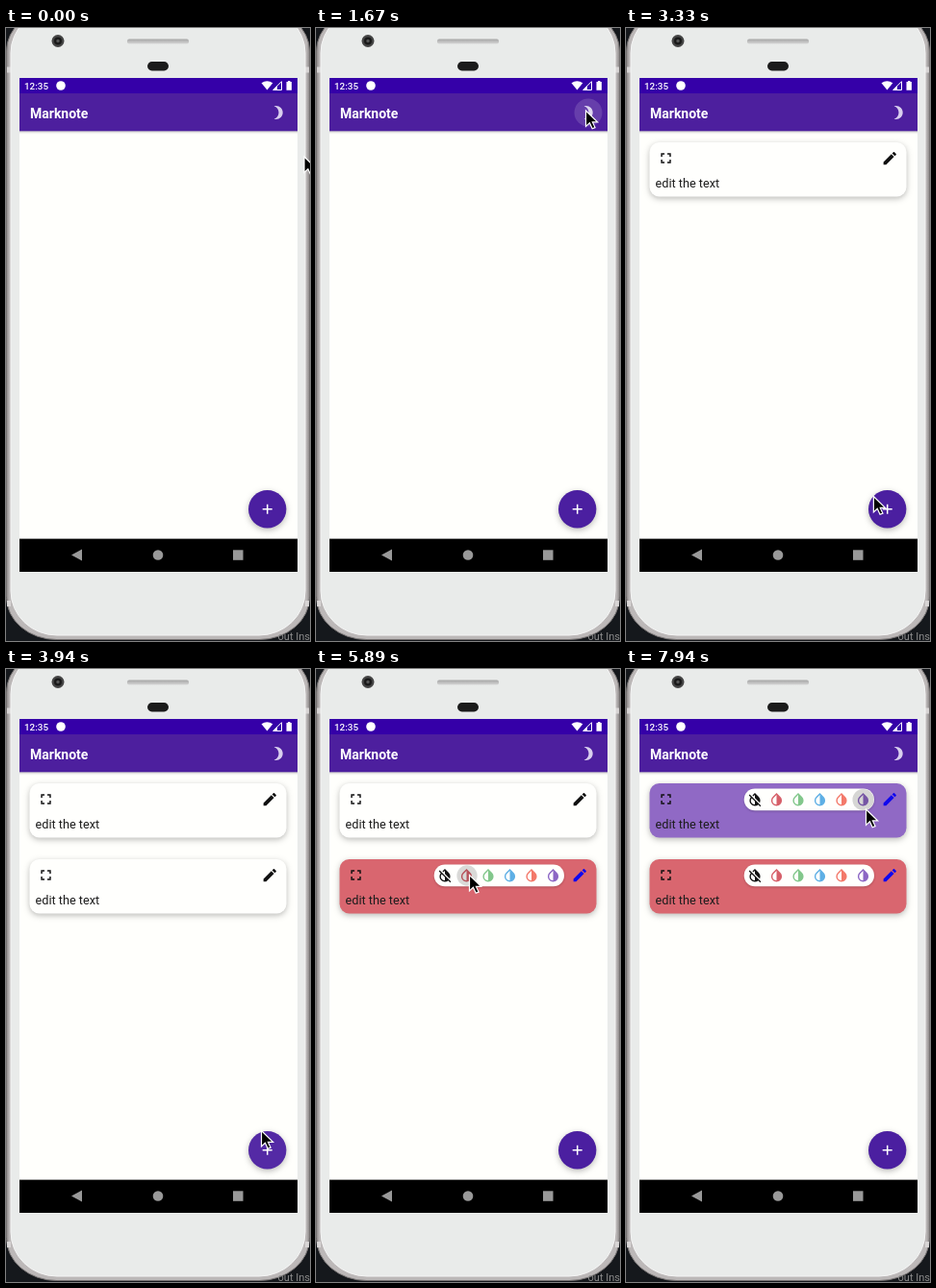
An HTML page that plays this animation: 316x638 px, repeating every 8 s.

```html
<!DOCTYPE html>
<html lang="en">
<head>
<meta charset="utf-8">
<title>Notes app demo</title>
<style>
  html, body { margin: 0; width: 100%; height: 100%; overflow: hidden; background: #15181c; }
  svg { display: block; width: 100vw; height: 100vh; }
  text { font-family: Roboto, sans-serif; }
  .bar { filter: drop-shadow(0 1px 1px rgba(0, 0, 0, .25)); }
  .raised { filter: drop-shadow(0 2px 3px rgba(0, 0, 0, .27)); }
  .pill { filter: drop-shadow(0 1px 1px rgba(0, 0, 0, .2)); }
</style>
</head>
<body>
<svg viewBox="0 0 316 638">
  <defs>
    <linearGradient id="speaker" x2="0" y2="1">
      <stop stop-color="#a5a5a5"/><stop offset="1" stop-color="#d6d6d6"/>
    </linearGradient>
    <linearGradient id="metal">
      <stop stop-color="#8b8787"/><stop offset=".01" stop-color="#bcb8b8"/>
      <stop offset=".99" stop-color="#bcb8b8"/><stop offset="1" stop-color="#8b8787"/>
    </linearGradient>
    <clipPath id="screenClip"><rect x="14" y="52" width="289" height="514"/></clipPath>
    <clipPath id="fabClip"><circle cx="271.7" cy="500.7" r="19.7"/></clipPath>
    <path id="moon" d="M9 2c-1.05 0-2.05.16-3 .46 4.06 1.27 7 5.06 7 9.54 0 4.48-2.94 8.27-7 9.54.95.3 1.95.46 3 .46 5.52 0 10-4.48 10-10S14.52 2 9 2z"/>
    <path id="sun" d="M20 8.69V4h-4.69L12 .69 8.69 4H4v4.69L.69 12 4 15.31V20h4.69L12 23.31 15.31 20H20v-4.69L23.31 12zM12 18a6 6 0 1 1 0-12 6 6 0 0 1 0 12z" fill-rule="evenodd"/>
    <path id="expand" d="M7 14H5v5h5v-2H7zM5 10h2V7h3V5H5zM17 17h-3v2h5v-5h-2zM14 5v2h3v3h2V5z"/>
    <path id="pencil" d="M3 17.25V21h3.75L17.81 9.94l-3.75-3.75zM20.71 7.04c.39-.39.39-1.02 0-1.41l-2.34-2.34c-.39-.39-1.02-.39-1.41 0l-1.83 1.83 3.75 3.75z"/>
    <path id="drop" d="M17.66 7.93L12 2.27 6.34 7.93c-3.12 3.12-3.12 8.19 0 11.31 3.12 3.12 8.2 3.12 11.32 0 3.12-3.12 3.12-8.19 0-11.31zM12 19.59c-3.3 0-6-2.7-6-6 0-1.6.62-3.11 1.76-4.24L12 5.1z"/>
    <path id="dropOff" d="M20.65 20.87L4.27 4.5 3 5.77l2.78 2.78c-2.55 3.14-2.36 7.76.56 10.69 2.92 2.92 7.55 3.12 10.69.56l2.7 2.7L21 21.23zM12 19.59c-3.3 0-6-2.7-6-6 0-1.32.43-2.57 1.21-3.6L12 14.77zM12 5.1v4.58l7.25 7.26c1.37-2.96.84-6.57-1.6-9.01L12 2.27l-3.7 3.7 1.41 1.41z"/>
  </defs>

  <!-- phone -->
  <rect width="316" height="638" fill="#15181c"/>
  <rect x=".5" y="-20" width="315" height="656.5" rx="52" ry="44" fill="url(#metal)" stroke="#777373"/>
  <path d="M1 43.5h4M311 43.5h4M1 599h4M311 599h4" stroke="#d8d5d5" stroke-width="6"/>
  <rect x="5" y="-20" width="306" height="652" rx="48" ry="46" fill="#e9ebea" stroke="#f5f5f5"/>
  <text x="316" y="637" font-size="11" text-anchor="end" fill="#8a8a8a">out Ins</text>
  <circle cx="54" cy="13.5" r="6.5" fill="#454545"/>
  <circle cx="54" cy="13.5" r="4" fill="#191919"/>
  <circle cx="54" cy="13.5" r="1.7" fill="#555"/>
  <rect x="126" y="11.5" width="64" height="5" rx="2" fill="url(#speaker)"/>
  <rect x="147" y="35" width="22" height="9.5" rx="4.7" fill="#1b1b1b"/>

  <!-- screen -->
  <g clip-path="url(#screenClip)">
    <rect id="page" x="14" y="52" width="289" height="514"/>
    <rect class="bar" x="10" y="60" width="297" height="47.3" fill="#4d1f9e"/>
    <rect x="14" y="52" width="289" height="16" fill="#3500a8"/>
    <rect x="14" y="531.6" width="289" height="35" fill="#000"/>
  </g>
  <g fill="#fff">
    <text x="19" y="64" font-size="9.9" font-weight="500">12:35</text>
    <circle cx="57" cy="60" r="4.8"/>
    <path d="M265.5 57.3q5.9-4 11.8 0l-5.9 7.2z"/>
    <path d="M286.5 55.7v8.8h-8.8z" fill="none" stroke="#fff"/>
    <path d="M282 60v4.5h-4.3z"/>
    <path d="M291.5 56h1.5v-1h2.4v1h1.5v8.7h-5.4z"/>
    <text x="25" y="94" font-size="14" font-weight="700">Marknote</text>
  </g>
  <use id="themeIcon" fill="#d9cfee" transform="translate(274.4 79.6) scale(.7)"/>
  <g fill="#999">
    <path d="M68 548.5l11-6v12z"/>
    <circle cx="158" cy="548.5" r="5.3"/>
    <rect x="236" y="543.3" width="10.5" height="10.5"/>
  </g>
  <g id="cards"></g>
  <circle class="raised" cx="271.7" cy="500.7" r="19.7" fill="#4b1fa0"/>
  <path d="M266.7 500.7h10M271.7 495.7v10" stroke="#fff" stroke-width="1.5"/>
  <g id="ripples"></g>
  <path id="cursor" d="M0 0V16.4L3.9 12.8 6.7 18.8 9.6 17.6 6.9 11.9H12.1Z" fill="#000" stroke="#fff" stroke-width="1.2"/>
</svg>
<script>
const TICKS_PER_SECOND = 18, LOOP = 8000;
const $ = id => document.getElementById(id);
const clamp = v => Math.max(0, Math.min(1, v));
const swatches = ['#111', '#d65f69', '#82c78b', '#5eafe5', '#f3796a', '#8c66c4'];

// All times below are in ticks.
const darkFrom = 14, darkTo = 30;
const cards = [
  { y: 119, shown: 53, menu: 125, painted: 139, color: '#9069c5' },
  { y: 198, shown: 67, menu: 85, painted: 106, color: '#d9666f' }
];
const ripples = [
  { from: 13, to: 20, x: 283, y: 88, r0: 8, r1: 17, color: '#fff', alpha: .27 },
  { from: 29, to: 36, x: 283, y: 88, r0: 14, r1: 17, color: '#fff', alpha: .14 },
  { from: 51, to: 58, x: 271.7, y: 500.7, r0: 8, r1: 22, color: '#fff', alpha: .15, fab: true },
  { from: 65, to: 74, x: 271.7, y: 500.7, r0: 8, r1: 22, color: '#fff', alpha: .07, fab: true },
  { from: 83, to: 91, x: 274, y: 215, r0: 8, r1: 17, color: '#000', alpha: .14 },
  { from: 105, to: 112, x: 157, y: 215, r0: 10.5, r1: 11.5, color: '#000', alpha: .15 },
  { from: 123, to: 131, x: 274, y: 136, r0: 8, r1: 17, color: '#000', alpha: .14 },
  { from: 138, to: 147, x: 246.5, y: 136, r0: 9, r1: 11.5, color: '#000', alpha: .16 }
];
// [tick, x, y] of the pointer tip
const path = [
  [3, 310, 134], [6, 275, 83], [7, 279.5, 85], [22, 279.5, 85], [23, 280.5, 86],
  [41, 280.5, 86], [47, 254.5, 490], [59, 254.5, 490], [62, 265.5, 480.5],
  [73, 265.5, 480.5], [78, 270, 236], [79, 270, 236], [82, 270, 209], [92, 270, 209],
  [94, 215, 229], [96, 162, 216], [98, 162, 216], [102, 159.5, 214.5], [111, 159.5, 214.5],
  [118, 263, 154.5], [119, 263, 154.5], [120, 263, 146], [131, 263, 146], [136, 249.5, 146]
];

const icon = (name, x, y, scale, fill, extra = '') =>
  `<use href="#${name}" fill="${fill}" transform="translate(${x} ${y}) scale(${scale}) translate(-12 -12)" ${extra}/>`;

$('cards').innerHTML = cards.map(card => `
  <g transform="translate(0 ${card.y})">
    <rect class="raised" x="24.5" width="267" height="56.5" rx="10"/>
    ${icon('expand', 41.5, 16.5, .74, '#111')}
    <text x="30.5" y="47" font-size="12.7" fill="#1c1c1c">edit the text</text>
    ${icon('pencil', 274.3, 16.6, .74, '#111', 'class="edit"')}
    <g class="menu">
      <rect class="pill" x="122.7" y="5.5" width="135.3" height="22.7" rx="11.3" fill="#fffffd"/>
      ${swatches.map((c, i) => icon(i ? 'drop' : 'dropOff', 134 + 22.5 * i, 16.8, .7, c)).join('')}
    </g>
  </g>`).join('');
cards.forEach((card, i) => {
  const g = card.group = $('cards').children[i];
  card.body = g.querySelector('.raised');
  card.edit = g.querySelector('.edit');
  card.popup = g.querySelector('.menu');
});

$('ripples').innerHTML = ripples.map(r =>
  `<g ${r.fab ? 'clip-path="url(#fabClip)"' : ''}><circle cx="${r.x}" cy="${r.y}" fill="${r.color}"/></g>`).join('');
ripples.forEach((r, i) => r.circle = $('ripples').children[i].firstChild);

function pointerAt(tick) {
  const next = path.findIndex(k => k[0] > tick);
  if (next === 0) return path[0].slice(1);
  if (next < 0) return path[path.length - 1].slice(1);
  const [t0, x0, y0] = path[next - 1], [t1, x1, y1] = path[next];
  const p = (tick - t0) / (t1 - t0), eased = p * p * (3 - 2 * p);
  return [x0 + (x1 - x0) * eased, y0 + (y1 - y0) * eased];
}

function draw(tick) {
  const dark = tick >= darkFrom && tick < darkTo;
  $('page').setAttribute('fill', dark ? '#151610' : '#fffffc');
  $('themeIcon').setAttribute('href', dark ? '#sun' : '#moon');
  for (const card of cards) {
    const open = tick >= card.menu;
    card.group.style.display = tick >= card.shown ? '' : 'none';
    card.body.setAttribute('fill', tick >= card.painted ? card.color : '#fffffd');
    card.edit.setAttribute('fill', open ? '#1008ee' : '#111');
    card.popup.style.opacity = clamp((tick - card.menu + 1) / 2);
  }
  for (const r of ripples) {
    const active = tick >= r.from && tick < r.to;
    const grown = clamp((tick - r.from) / 6);
    r.circle.setAttribute('r', r.r0 + (r.r1 - r.r0) * grown);
    r.circle.setAttribute('opacity', active ? r.alpha * clamp((r.to - tick) / 4) : 0);
  }
  $('cursor').setAttribute('transform', `translate(${pointerAt(tick)})`);
}

const start = performance.now();
function frame() {
  const time = (performance.now() - start) % LOOP;
  draw(Math.floor(time * TICKS_PER_SECOND / 1000 + .1));
  requestAnimationFrame(frame);
}
frame();
</script>
</body>
</html>
```
